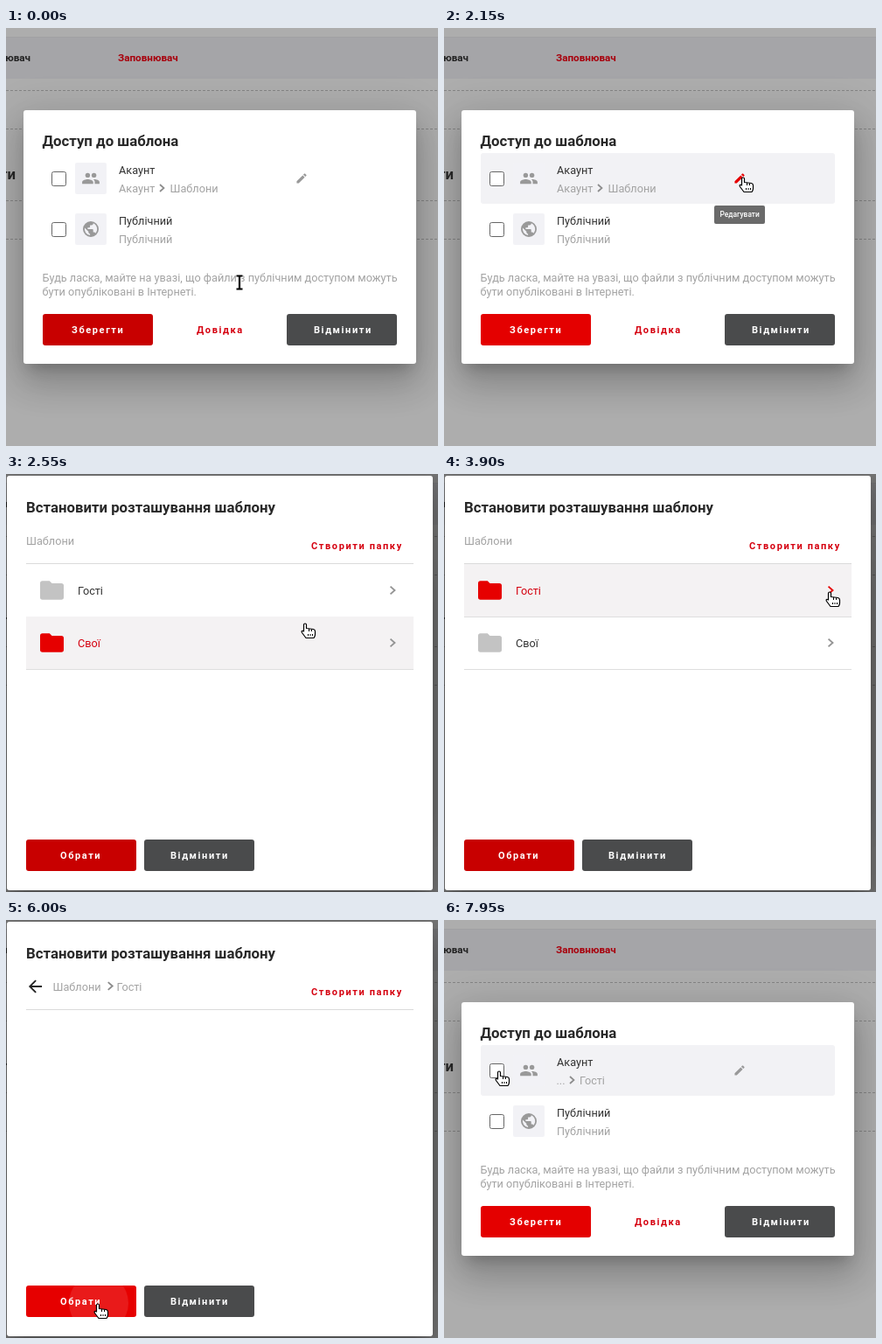
Recreate the animation shown at these times as an HTML page. Size 494x478 px, loop 8 s.

```html
<!DOCTYPE html>
<html lang="uk">
<head>
<meta charset="utf-8">
<title>Доступ до шаблона</title>
<style>
  html, body { margin: 0; width: 100%; height: 100%; overflow: hidden; background: #adadad; }
  #stage { position: relative; width: 494px; height: 478px; overflow: hidden; }
  svg, .layer { position: absolute; left: 0; top: 0; width: 494px; height: 478px; }
  .panel {
    position: absolute; background: #fff; border-radius: 3px;
    box-shadow: 0 11px 15px -7px rgba(0,0,0,.2), 0 24px 38px 3px rgba(0,0,0,.14), 0 9px 46px 8px rgba(0,0,0,.12);
  }
  #access { left: 20px; top: 94px; width: 449px; height: 290px; }
  #picker { left: 1px; top: 2px; width: 487px; height: 474px; }
  #shade { background: #000; }
  text { font: 12.7px Roboto, "Noto Sans", sans-serif; fill: #333; }
  .title { font-size: 16.8px; font-weight: 700; fill: #282828; }
  .muted { fill: #a3a3a3; }
  .head { font-size: 11.7px; font-weight: 700; fill: #222; }
  .btn { font-size: 11px; font-weight: 700; letter-spacing: 1.6px; fill: #fff; }
  .link { fill: #d5000f; }
  .tip { font-size: 8.4px; font-weight: 500; fill: #fff; }
</style>
</head>
<body>
<div id="stage">
  <svg id="page"></svg>
  <div class="panel" id="access"></div>
  <svg id="accessArt"></svg>
  <div class="layer" id="shade"></div>
  <div class="layer" id="pickerLayer">
    <div class="panel" id="picker"></div>
    <svg id="pickerArt"></svg>
  </div>
  <svg id="pointer"></svg>
</div>
<script>
const LOOP = 8000, STEP = 50;
const OPEN = 2300, ENTER = 4300, PRESS = 5860, CLOSE = 6220;
const RED = '#e60000', DARK_RED = '#c80000', GREY = '#4a4b4c';
const $ = id => document.getElementById(id);

const label = (x, y, str, cls = '', extra = '') =>
  `<text x="${x}" y="${y}" class="${cls}" ${extra}>${str}</text>`;
const box = (x, y, w, h, fill, r = 0, extra = '') =>
  `<rect x="${x}" y="${y}" width="${w}" height="${h}" rx="${r}" fill="${fill}" ${extra}/>`;
const icon = (x, y, scale, body, fill, id = '') =>
  `<g id="${id}" fill="${fill}" transform="translate(${x} ${y}) scale(${scale}) translate(-12 -12)">${body}</g>`;
const chevron = (x, y, s = 1, id = '') =>
  `<path id="${id}" d="M-2.5-4L2 0l-4.5 4" transform="translate(${x} ${y}) scale(${s})" fill="none" stroke="#8c8c8c" stroke-width="1.7"/>`;
const button = (x, y, tx, str, fill, id = '') =>
  box(x, y, 126, 36, fill, 3, `id="${id}"`) + label(tx, y + 22, str, 'btn');
const rule = (y, color, dash = '', x1 = 0, x2 = 494) =>
  `<path d="M${x1} ${y}H${x2}" stroke="${color}" stroke-dasharray="${dash}"/>`;

const PEOPLE = '<circle cx="8" cy="8" r="3"/><circle cx="16" cy="8" r="3"/>' +
  '<path d="M1 19v-2.5C1 14.2 5.7 13 8 13s7 1.2 7 3.5V19zM17 19v-2.5c0-1.5-.8-2.6-2-3.4 3-.4 8 .8 8 3.4V19z"/>';
const GLOBE = '<path d="M12 2a10 10 0 1 0 0 20 10 10 0 0 0 0-20zm-1 17.9A8 8 0 0 1 4.2 10.200L9 15v1a2 2 0 0 0 2 2zm6.9-2.500A2 2 0 0 0 16 16h-1v-3a1 1 0 0 0-1-1H8v-2h2a1 1 0 0 0 1-1V7h2a2 2 0 0 0 2-2v-.4a8 8 0 0 1 2.9 12.800z"/>';
const PENCIL = '<path d="M3 17.200V21h3.800L17.800 9.900 14.100 6.200zM20.700 7a1 1 0 0 0 0-1.400l-2.300-2.300a1 1 0 0 0-1.400 0l-1.900 1.800 3.800 3.800z"/>';
const FOLDER = '<path d="M10 4H4a2 2 0 0 0-2 2v12a2 2 0 0 0 2 2h16a2 2 0 0 0 2-2V8a2 2 0 0 0-2-2h-8z"/>';
const BACK = '<path d="M20 11H7.800l5.600-5.600L12 4l-8 8 8 8 1.400-1.400L7.800 13H20z"/>';

$('page').innerHTML =
  box(0, 10, 494, 48, '#a5a5a8') + rule(10.5, '#a1a1a3') +
  label(28, 38, 'нювач', 'head', 'text-anchor="end"') +
  label(128, 38, 'Заповнювач', 'head', 'style="fill:#a8000c"') +
  [71.5, 115.5, 197.5, 241.5].map(y => rule(y, '#858585', '3 2')).join('') +
  label(11, 173, 'ти', 'title', 'text-anchor="end"');

const accessRow = (y, name, art, id) =>
  box(42, y, 405, 58, '#f2f2f5', 3, `id="${id}"`) +
  box(52.5, y + 21.5, 16, 16, '#fff', 2, 'stroke="#666"') +
  box(79, y + 11, 36, 36, '#f2f2f6', 2) +
  icon(97, y + 29, .9, art, '#999') + label(129, y + 24, name);

$('accessArt').innerHTML =
  label(41.5, 135, 'Доступ до шаблона', 'title') +
  accessRow(143, 'Акаунт', PEOPLE, 'row0') +
  accessRow(201, 'Публічний', GLOBE, 'row1') +
  `<g id="pathOld">${label(129, 188, 'Акаунт', 'muted') + chevron(178.500, 183) + label(187.5, 188, 'Шаблони', 'muted')}</g>` +
  `<g id="pathNew">${label(128.5, 188, '...', 'muted') + chevron(146.500, 183) + label(155, 188, 'Гості', 'muted')}</g>` +
  label(129, 246, 'Публічний', 'muted') +
  icon(338, 172, .62, PENCIL, '#999', 'pencil') +
  label(41.5, 290, 'Будь ласка, майте на увазі, що файли з публічним доступом можуть', 'muted') +
  label(41.5, 306, 'бути опубліковані в Інтернеті.', 'muted') +
  button(42, 327, 75, 'Зберегти', RED, 'save') +
  label(218, 349, 'Довідка', 'btn link') +
  button(321, 327, 352, 'Відмінити', GREY) +
  `<g id="tooltip">${box(309, 203, 58, 21, '#6a6a6a', 2) + label(315.5, 216, 'Редагувати', 'tip')}</g>`;

const folderRow = (y, name, n) =>
  box(23, y, 443, 60, '#f4f2f3', 0, `id="item${n}"`) +
  icon(52.5, y + 30, 1.35, FOLDER, '#c3c3c3', 'folder' + n) +
  label(82, y + 35, name, '', `id="name${n}"`) +
  chevron(442.300, y + 30, 1.1, 'go' + n) +
  rule(y + 60.5, '#dedede', '', 23, 466);

$('pickerArt').innerHTML =
  label(23, 44, 'Встановити розташування шаблону', 'title') +
  label(349, 86, 'Створити папку', 'btn link') +
  `<g id="listView">${label(23, 81, 'Шаблони', 'muted') + folderRow(103, 'Гості', 0) + folderRow(163, 'Свої', 1)}</g>` +
  `<g id="emptyView">${icon(33.500, 76, .94, BACK, '#222') + label(53.5, 81, 'Шаблони', 'muted') +
    chevron(119.500, 75.500, 1.1) + label(126.5, 81, 'Гості', 'muted')}</g>` +
  rule(102.5, '#dadada', '', 23, 466) +
  button(23, 418, 62, 'Обрати', RED, 'choose') +
  `<clipPath id="chooseClip">${box(23, 418, 126, 36, '#fff', 3)}</clipPath>` +
  '<circle id="ripple" cx="106" cy="438" fill="#fff" clip-path="url(#chooseClip)"/>' +
  button(158, 418, 188, 'Відмінити', GREY);

const outlined = d => `<path d="${d}" fill="#fff" stroke="#000" stroke-width="1.2" stroke-linejoin="round"/>`;
const beam = 'M-3.500-7.500H3.500M0-7.500V7.500M-3.500 7.500H3.500';
const POINTERS = {
  arrow: outlined('M0 0V16l3.700-3.400 2.600 6 2.700-1.200-2.600-5.700H11.500z'),
  hand: outlined('M-1.500 9V1.500a1.500 1.500 0 0 1 3 0V5.500l8 1q2 .5 2 2.500v3.500q0 2-1.500 4H1l-4.500-6q-1-2.200 .5-2.200z') +
    '<path d="M4.500 6v3M7.500 6.500v2.500M3.500 12v2M6 12v2M8.500 12v2" stroke="#000" fill="none"/>',
  beam: `<path d="${beam}" stroke="#fff" stroke-width="4.500"/><path d="${beam}" stroke="#000" stroke-width="2.200"/>`
};
$('pointer').innerHTML = Object.entries(POINTERS)
  .map(([kind, art]) => `<g id="${kind}">${art}</g>`).join('');

// Pointer stops: time, x, y
const STOPS = [
  [0, 267, 291], [100, 267, 291], [800, 341.5, 170.5], [2750, 341.5, 170.5],
  [3500, 441, 135], [4800, 441, 135], [5800, 104.5, 438.5], [6740, 104.5, 438.5],
  [7500, 62.5, 172.5], [LOOP, 62.5, 172.5]
];
const ramp = (t, from, to) => Math.min(1, Math.max(0, (t - from) / (to - from)));
const ease = u => u * u * (3 - 2 * u);

function pointerAt(t) {
  const i = STOPS.findIndex((s, n) => n && t < s[0]);
  const [t0, x0, y0] = STOPS[i - 1], [t1, x1, y1] = STOPS[i];
  const u = ease(ramp(t, t0, t1));
  return [x0 + (x1 - x0) * u, y0 + (y1 - y0) * u];
}
const show = (id, opacity) => { $(id).style.opacity = +opacity; };
const paint = (id, color, prop = 'fill') => { $(id).style[prop] = color; };

function render(t) {
  const [x, y] = pointerAt(t);
  const over = (l, top, r, b) => x >= l && x < r && y >= top && y < b;
  const picking = t >= OPEN + 50 && t < CLOSE;
  let kind = 'arrow';

  const row = [143, 201].map(top => !picking && over(42, top, 447, top + 58));
  row.forEach((on, n) => show('row' + n, on));
  const onPencil = !picking && over(330, 163, 347, 181);
  paint('pencil', onPencil ? RED : '#999');
  show('tooltip', onPencil && t < OPEN ? ramp(t, 950, 1100) : 0);
  show('pathOld', t < CLOSE);
  show('pathNew', t >= CLOSE);
  const focus = Math.round(200 + 28 * ramp(t, 150, 800));
  paint('save', `rgb(${focus},0,0)`);

  const inList = picking && t < ENTER;
  [103, 163].forEach((top, n) => {
    const on = inList && over(23, top, 466, top + 60);
    show('item' + n, on);
    paint('folder' + n, on ? RED : '#c3c3c3');
    paint('name' + n, on ? '#d5000f' : '#333');
    paint('go' + n, on && x > 430 ? RED : '#949494', 'stroke');
    if (on) kind = 'hand';
  });
  show('listView', t < ENTER);
  show('emptyView', t >= ENTER);
  const onChoose = picking && over(23, 418, 149, 454);
  paint('choose', onChoose ? RED : DARK_RED);
  $('ripple').setAttribute('r', 34 * ramp(t, PRESS, PRESS + 140) + 46 * ramp(t, PRESS + 140, CLOSE));
  show('ripple', t > PRESS ? .1 * (1 - ramp(t, PRESS + 160, CLOSE)) : 0);

  const opened = ramp(t, OPEN, OPEN + 150) * (1 - ramp(t, CLOSE, CLOSE + 100));
  show('shade', .32 * opened);
  show('pickerLayer', opened);
  const grow = t < CLOSE ? .7 + .3 * (1 - (1 - ramp(t, OPEN, OPEN + 150)) ** 2) : 1;
  $('pickerLayer').style.transform = `scale(${grow})`;

  if (onChoose || onPencil) kind = 'hand';
  if (!picking) {
    if (over(50, 162, 71, 183) || over(50, 220, 71, 241) || over(42, 327, 168, 363)) kind = 'hand';
    if (over(42, 279, 441, 295) || over(42, 295, 217, 309)) kind = 'beam';
  }
  Object.keys(POINTERS).forEach(k => show(k, k === kind));
  $(kind).setAttribute('transform', `translate(${Math.round(x)} ${Math.round(y)})`);
}

const start = performance.now();
function tick() {
  const t = (performance.now() - start) % LOOP;
  render(Math.floor(t / STEP) * STEP);
  requestAnimationFrame(tick);
}
tick();
</script>
</body>
</html>
```
